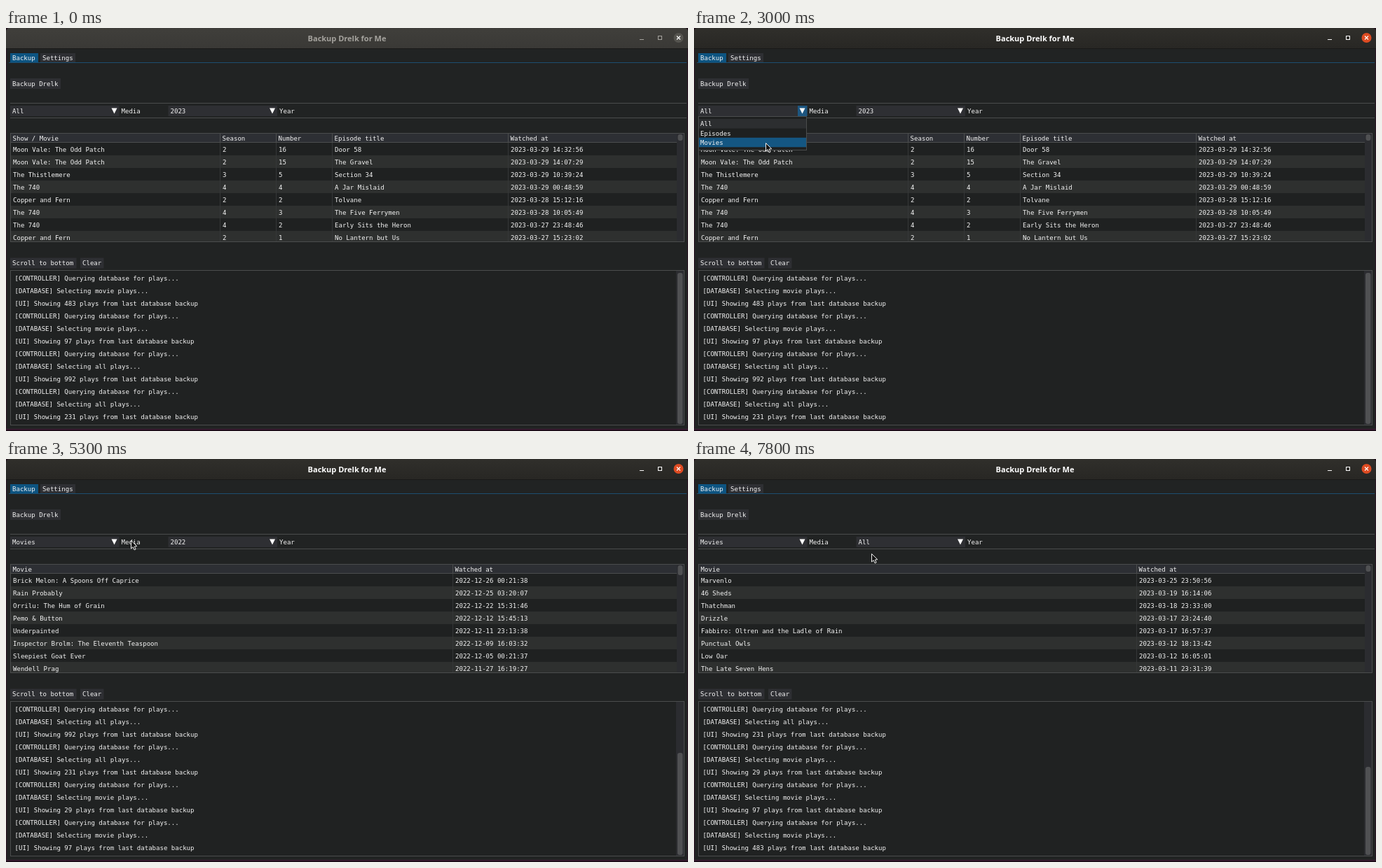
An HTML page with a canvas that plays this animation: 973 by 576 pixels, repeating every 8000 ms.

```html
<!DOCTYPE html>
<html lang="en">
<head>
<meta charset="utf-8">
<title>Backup</title>
<style>
  html, body { margin: 0; width: 100%; height: 100%; overflow: hidden; background: #212323; }
  canvas { display: block; }
</style>
</head>
<body>
<canvas id="stage" width="973" height="576"></canvas>
<script>
const ctx = document.getElementById('stage').getContext('2d');
const LOOP = 8000, STEP = 100;
const MONO = '9.05px "DejaVu Sans Mono", monospace';
const C = {
  bg: '#212323', frame: '#2e2f33', line: '#4b4d4d', text: '#f4f4f4',
  rowDark: '#1f2121', rowLight: '#2e302f', column: '#353738',
  hover: '#245373', press: '#145682', tab: '#0d5481', tabLine: '#1c4e70',
  track: '#2b2c30', thumb: '#505153'
};

const shows = [
  ['Moon Vale: The Odd Patch', '2', '16', 'Door 58', '2023-03-29 14:32:56'],
  ['Moon Vale: The Odd Patch', '2', '15', 'The Gravel', '2023-03-29 14:07:29'],
  ['The Thistlemere', '3', '5', 'Section 34', '2023-03-29 10:39:24'],
  ['The 740', '4', '4', 'A Jar Mislaid', '2023-03-29 00:48:59'],
  ['Copper and Fern', '2', '2', 'Tolvane', '2023-03-28 15:12:16'],
  ['The 740', '4', '3', 'The Five Ferrymen', '2023-03-28 10:05:49'],
  ['The 740', '4', '2', 'Early Sits the Heron', '2023-03-27 23:48:46'],
  ['Copper and Fern', '2', '1', 'No Lantern but Us', '2023-03-27 15:23:02']
];
const recent = [
  ['Marvenlo', '2023-03-25 23:50:56'],
  ['46 Sheds', '2023-03-19 16:14:06'],
  ['Thatchman', '2023-03-18 23:33:00'],
  ['Drizzle', '2023-03-17 23:24:40'],
  ['Fabbiro: Oltren and the Ladle of Rain', '2023-03-17 16:57:37'],
  ['Punctual Owls', '2023-03-12 18:13:42'],
  ['Low Oar', '2023-03-12 16:05:01'],
  ['The Late Seven Hens', '2023-03-11 23:31:39']
];
const older = [
  ['Brick Melon: A Spoons Off Caprice', '2022-12-26 00:21:38'],
  ['Rain Probably', '2022-12-25 03:20:07'],
  ['Orrilu: The Hum of Grain', '2022-12-22 15:31:46'],
  ['Pemo & Button', '2022-12-12 15:45:13'],
  ['Underpainted', '2022-12-11 23:13:38'],
  ['Inspector Brolm: The Eleventh Teaspoon', '2022-12-09 16:03:32'],
  ['Sleepiest Goat Ever', '2022-12-05 00:21:37'],
  ['Wendell Prag', '2022-11-27 16:19:27']
];

const showHead = ['Show / Movie', 'Season', 'Number', 'Episode title', 'Watched at'];
const movieHead = ['Movie', 'Watched at'];
// One view per chosen filter.
const views = [
  { head: showHead, cols: [306, 386, 466, 717], rows: shows, thumb: 9, logTop: 350, media: 'All', year: '2023' },
  { head: movieHead, cols: [632], rows: recent, thumb: 45, logTop: 392, media: 'Movies', year: '2023' },
  { head: movieHead, cols: [638], rows: older, thumb: 14, logTop: 420, media: 'Movies', year: '2022' },
  { head: movieHead, cols: [632], rows: recent, thumb: 9, logTop: 440, media: 'Movies', year: 'All' }
];
const viewStarts = [3100, 4900, 7800];

const queries = [['movie', 483], ['movie', 97], ['all', 992], ['all', 231], ['movie', 29], ['movie', 97], ['movie', 483]];
const logLines = queries.flatMap(([kind, count]) => [
  '[CONTROLLER] Querying database for plays...',
  `[DATABASE] Selecting ${kind} plays...`,
  `[UI] Showing ${count} plays from last database backup`
]);

const mediaBox = { x: 6, label: 'Media', items: ['All', 'Episodes', 'Movies'], bottom: 174.5, open: [[1700, 3100]] };
const yearBox = { x: 231.5, label: 'Year', items: ['All', '2023', '2022', '2021'], bottom: 187.5, scroll: true, open: [[4000, 4900], [6600, 7800]] };

// Pointer path: time, x, y.
const path = [
  [400, 95, 31], [500, 95, 69], [600, 95, 69], [900, 103, 113], [1100, 103, 113],
  [1300, 108, 118], [1800, 108, 118], [2100, 104, 136], [2200, 104, 136],
  [2600, 102, 164], [3000, 102, 164], [3100, 111, 163], [3200, 111, 163],
  [3400, 303, 118], [3900, 303, 118], [4100, 303, 134], [4200, 303, 134],
  [4300, 302, 143.5], [4500, 300, 160], [4800, 300, 160], [5000, 290, 160],
  [5100, 290, 160], [5300, 178, 116], [5400, 130, 112], [5500, 130, 112],
  [5600, 128, 108], [5800, 130, 114], [5900, 130, 114], [6500, 253, 121],
  [6600, 253, 121], [6800, 259, 142], [6900, 259, 142], [7100, 253, 136],
  [7200, 253, 136], [7300, 255, 127], [7400, 253, 135], [8000, 253, 135]
];

function pointerAt(t) {
  if (t < path[0][0]) return null;
  const i = path.findIndex(p => p[0] > t);
  const [t0, x0, y0] = path[i - 1], [t1, x1, y1] = path[i];
  const k = (t - t0) / (t1 - t0);
  return { x: x0 + (x1 - x0) * k, y: y0 + (y1 - y0) * k };
}

function fill(color, x, y, w, h, r = 0) {
  ctx.fillStyle = color;
  ctx.beginPath();
  ctx.roundRect(x, y, w, h, r);
  ctx.fill();
}

function outline(x, y, w, h) {
  ctx.strokeStyle = C.line;
  ctx.lineWidth = 1;
  ctx.strokeRect(x + 0.5, y + 0.5, w - 1, h - 1);
}

// y is the middle of the capitals.
function text(s, x, y) {
  ctx.font = MONO;
  ctx.fillStyle = C.text;
  ctx.fillText(s, x, y + 3.3);
}

function button(s, x, y, w, h, color = C.frame) {
  fill(color, x, y, w, h);
  text(s, x + 3, y + h / 2 - 0.2);
}

function drawTitleBar(focused) {
  const ink = focused ? '#ffffff' : '#a5a39e';
  const shade = ctx.createLinearGradient(0, 0, 0, 29);
  shade.addColorStop(0, focused ? '#302f2b' : '#403f3b');
  shade.addColorStop(1, focused ? '#282724' : '#3a3936');
  fill('#1d0c18', 0, 0, 973, 30);
  fill(shade, 0, 0, 973, 29, [5, 5, 0, 0]);
  fill('#191918', 0, 29, 973, 1);
  ctx.font = 'bold 11px "Open Sans", "Noto Sans", sans-serif';
  ctx.textAlign = 'center';
  ctx.fillStyle = ink;
  ctx.fillText('Backup Drelk for Me', 486.5, 18.5);
  ctx.textAlign = 'left';

  fill(ink, 904, 16, 6, 1);
  ctx.strokeStyle = ink;
  ctx.lineWidth = 1;
  ctx.strokeRect(930.5, 11.5, 5, 5);
  ctx.fillStyle = focused ? '#de4b22' : '#55544f';
  ctx.beginPath();
  ctx.arc(959.5, 14, 7, 0, Math.PI * 2);
  ctx.fill();
  ctx.strokeStyle = '#ffffff';
  ctx.lineWidth = 1.2;
  ctx.beginPath();
  ctx.moveTo(957, 11.5); ctx.lineTo(962, 16.5);
  ctx.moveTo(962, 11.5); ctx.lineTo(957, 16.5);
  ctx.stroke();
}

function drawCombo(box, value, open, hovered) {
  const { x } = box;
  fill(hovered ? C.hover : C.frame, x, 111, 155.5, 15);
  if (open) fill('#1d5680', x + 142, 111, 13.5, 15);
  text(value, x + 3, 118.5);
  text(box.label, x + 158.5, 118.5);
  ctx.fillStyle = '#ffffff';
  ctx.beginPath();
  ctx.moveTo(x + 144.5, 114.5);
  ctx.lineTo(x + 152.5, 114.5);
  ctx.lineTo(x + 148.5, 122.5);
  ctx.fill();
}

function drawPopup(box, value, pointer, pressed) {
  const top = 126, pitch = 13.4, x = Math.round(box.x);
  const width = 155, rowWidth = box.scroll ? 142 : 153;
  fill('#1e2020', x, top, width, box.bottom - top);
  const over = Math.floor((pointer.y - 130) / pitch);
  box.items.forEach((item, i) => {
    const y = 130 + i * pitch;
    if (i === over) fill(pressed ? C.press : C.hover, x + 1, y, rowWidth, pitch);
    else if (item === value) fill('#2c2e30', x + 1, y, rowWidth, pitch);
    text(item, box.x + 3, y + 7);
  });
  if (box.scroll) {
    fill(C.track, x + 144, top + 1, 10, box.bottom - top - 2);
    fill(C.thumb, x + 146, top + 2, 7, 10, 3);
  }
  outline(x, top, width, Math.round(box.bottom) - top);
}

function drawTable(view) {
  const top = 150, bodyTop = 164, pitch = 18, bottom = 306;
  const starts = [7, ...view.cols];
  fill('#2d2f34', 6, top, 961, bodyTop - top);
  view.rows.forEach((row, i) => {
    const y = bodyTop + i * pitch;
    fill(i % 2 ? C.rowLight : C.rowDark, 7, y, 950, Math.min(pitch, bottom - y));
    row.forEach((cell, c) => text(cell, starts[c] + 3, y + 9.3));
  });
  view.head.forEach((cell, c) => text(cell, starts[c] + 2.6, 157.5));
  view.cols.forEach(x => {
    fill(C.line, x - 1, top, 1, bodyTop - top);
    fill(C.column, x - 1, bodyTop, 1, bottom - bodyTop);
  });
  fill(C.line, 6, bodyTop - 1, 951, 1);
  fill(C.track, 957, top, 10, bottom - top);
  fill(C.thumb, 958.5, 152, 7, view.thumb, 3);
  outline(6, top, 962, bottom - top);
}

function drawLog(first, thumbTop) {
  fill('#202222', 6, 346, 961, 222);
  logLines.slice(first * 3, first * 3 + 12).forEach((line, i) => text(line, 12.5, 358 + i * 17.95));
  fill(C.track, 956, 347, 11, 220);
  fill(C.thumb, 958, thumbTop, 7.5, 566 - thumbTop, 3);
  outline(6, 346, 962, 222);
}

function drawPointer({ x, y }) {
  ctx.save();
  ctx.translate(x + 0.5, y + 0.5);
  ctx.beginPath();
  ctx.moveTo(0, 0);
  ctx.lineTo(0, 11.5);
  ctx.lineTo(2.7, 9.2);
  ctx.lineTo(4.6, 13.4);
  ctx.lineTo(6.6, 12.5);
  ctx.lineTo(4.8, 8.5);
  ctx.lineTo(8.3, 8.2);
  ctx.closePath();
  ctx.fillStyle = '#151515';
  ctx.fill();
  ctx.strokeStyle = '#eeeeee';
  ctx.lineWidth = 1;
  ctx.stroke();
  ctx.restore();
}

function draw(t) {
  const focused = t >= 1500;
  const stage = viewStarts.filter(start => t >= start).length;
  const view = views[stage];
  const pressed = viewStarts.some(start => t >= start - STEP && t < start);
  const pointer = pointerAt(t);
  const combos = [[mediaBox, view.media], [yearBox, view.year]];
  const isOpen = box => box.open.some(([a, b]) => t >= a && t < b);
  const openCombo = combos.find(([box]) => isOpen(box));
  const isOver = box => focused && !openCombo &&
    pointer.x >= box.x && pointer.x < box.x + 155.5 && pointer.y >= 111 && pointer.y < 126;

  fill(C.bg, 0, 0, 973, 576);
  drawTitleBar(focused);

  button('Backup', 6, 36, 40, 13.5, C.tab);
  button('Settings', 49, 36, 50, 13.5);
  fill(C.tabLine, 4, 49, 967, 1);
  button('Backup Drelk', 6, 72, 72, 15);
  fill(C.line, 6, 107, 965, 1);
  fill(C.line, 6, 128, 965, 1);
  combos.forEach(([box, value]) => drawCombo(box, value, isOpen(box), isOver(box)));
  drawTable(view);
  button('Scroll to bottom', 6, 328.5, 94.5, 15);
  button('Clear', 106, 328.5, 33.5, 15);
  drawLog(stage, view.logTop);

  fill('#2b1525', 0, 30, 1, 546);
  fill('#2b1525', 972, 30, 1, 546);
  fill('#44203b', 0, 573, 973, 1);
  fill('#1f0d1a', 0, 574, 973, 2);

  if (openCombo) drawPopup(...openCombo, pointer, pressed);
  if (pointer) drawPointer(pointer);
}

const started = performance.now();
function tick() {
  const t = (performance.now() - started) % LOOP;
  draw(Math.floor(t / STEP) * STEP);
  requestAnimationFrame(tick);
}
tick();
</script>
</body>
</html>
```
